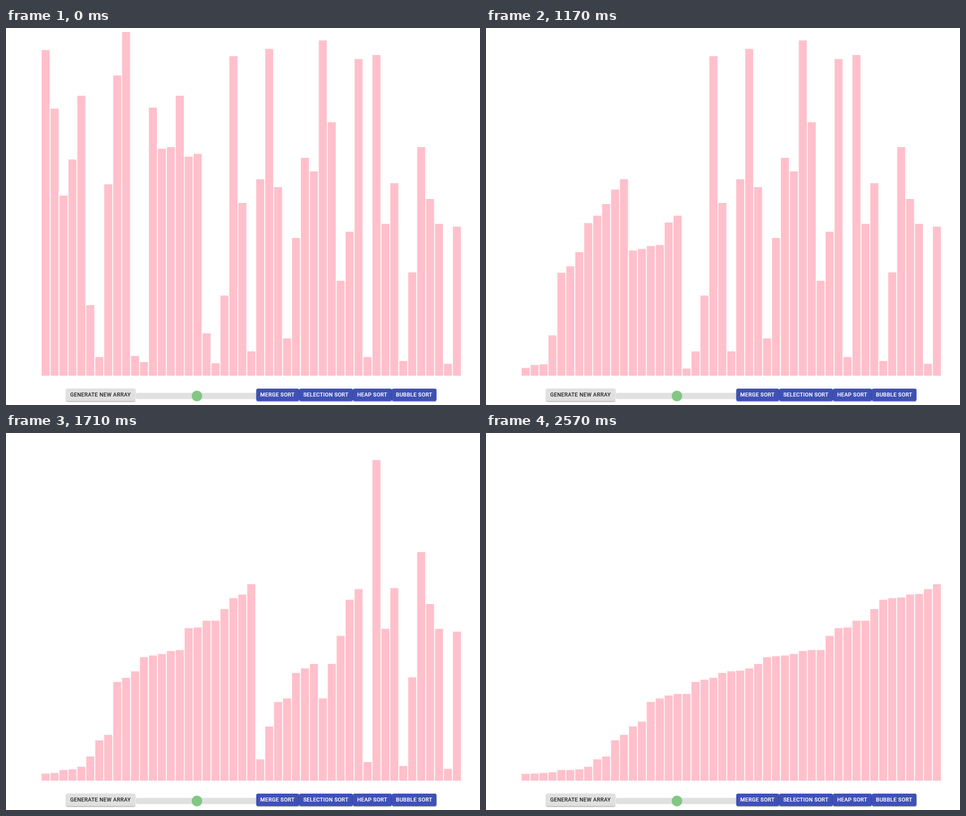
Animation of 839x668 px, one loop 3670 ms. Source, as an HTML page:

```html
<!DOCTYPE html>
<html lang="en">
<head>
<meta charset="utf-8">
<title>Merge sort</title>
<style>
  html, body { margin: 0; width: 100%; height: 100%; overflow: hidden; background: #fff; }
  #stage { position: relative; width: 839px; height: 668px; overflow: hidden; }
  svg { position: absolute; left: 0; top: 0; }
  .btn {
    position: absolute; top: 639px; height: 22px; box-sizing: border-box;
    padding-left: 7.4px; border-radius: 3px; overflow: hidden; white-space: nowrap;
    font: 500 9.58px/21.6px Roboto, "Liberation Sans", sans-serif; letter-spacing: .02857em;
    color: #fff; background: #3f51b5; -webkit-text-stroke: .2px #fff;
    box-shadow: 0 2.2px .7px -1.5px rgba(0,0,0,.2), 0 1.5px 1.5px rgba(0,0,0,.14), 0 .7px 3.7px rgba(0,0,0,.12);
  }
  .plain { color: rgba(0,0,0,.87); background: #e0e0e0; -webkit-text-stroke: 0; }
  #ripple { position: absolute; border-radius: 50%; background: #fff; }
</style>
</head>
<body>
<div id="stage">
  <svg width="839" height="668" viewBox="0 0 839 668">
    <g id="bars"></g>
    <rect x="230" y="646.4" width="220" height="11.1" rx="3.7" fill="#e0e0e0"/>
    <circle cx="338" cy="652" r="9.4" fill="#82c784"/>
  </svg>
</div>
<script>
const LOOP = 3670, BASE = 616;
const SHRINK = 4 / 7; // bars become shorter once the sort writes them

// The array to sort, as the top edge of each bar.
const tops = [39, 143, 297, 233, 120, 491, 583, 277, 84, 7, 581, 592, 141, 214, 211, 120,
  228, 223, 541, 594, 474, 50, 310, 573, 268, 37, 282, 550, 372, 230, 254, 22,
  167, 448, 361, 55, 583, 48, 347, 275, 590, 433, 211, 303, 347, 595, 352];
const heights = tops.map(y => BASE - y);

// Each move: the two bars compared, then the slot that gets a new height.
const moves = [];
function mergeSort(list, from, to) {
  if (from === to) return;
  const mid = (from + to) >> 1;
  mergeSort(list, from, mid);
  mergeSort(list, mid + 1, to);
  const old = list.slice();
  let i = from, j = mid + 1;
  for (let k = from; k <= to; k++) {
    const a = i <= mid ? i : j, b = j <= to ? j : i;
    const left = j > to || (i <= mid && old[i] <= old[j]);
    list[k] = old[left ? i++ : j++];
    moves.push({ a, b, k, h: list[k] * SHRINK });
  }
}
mergeSort(heights.slice(), 0, heights.length - 1);
const STEPS = moves.length * 3; // mark, unmark, set height

// Sort steps done by a given time; the page stalls briefly after the click.
const pace = [[700, 0], [720, 10], [800, 14], [1010, 112], [1340, 274], [1710, 453], [2100, 610], [2500, STEPS]];

// The screen repaints about every 26 ms, in bursts with short pauses between.
const bursts = [[270, 770], [800, 1320], [1340, 1790], [1890, 2410], [2440, 2570]];
function lastRepaint(time) {
  const burst = bursts.filter(([start]) => start <= time).pop();
  if (!burst) return 0;
  const [start, end] = burst;
  const gap = (end - start) / Math.round((end - start) / 26);
  const tick = n => Math.round((start + n * gap) / 10) * 10;
  let n = Math.ceil((Math.min(time, end) - start) / gap);
  if (tick(n) > time) n--;
  return Math.min(tick(n), end);
}

const clamp = v => Math.min(1, Math.max(0, v));
const ramp = (t, from, to) => clamp((t - from) / (to - from));
const smooth = p => p * p * (3 - 2 * p);

function along(points, t) {
  const next = points.findIndex(([time]) => time >= t);
  if (next < 0) return points[points.length - 1][1];
  if (next === 0) return points[0][1];
  const [t0, v0] = points[next - 1], [t1, v1] = points[next];
  return v0 + (v1 - v0) * ramp(t, t0, t1);
}

const bars = heights.map((h, i) => {
  const bar = document.createElementNS('http://www.w3.org/2000/svg', 'rect');
  bar.setAttribute('x', 63.05 + 15.826 * i);
  bar.setAttribute('width', 14.2);
  return document.getElementById('bars').appendChild(bar);
});

function addButton(label, left, right, kind = '') {
  const el = document.createElement('div');
  el.className = 'btn ' + kind;
  el.textContent = label;
  el.style.left = left + 'px';
  el.style.width = right - left + 'px';
  return document.getElementById('stage').appendChild(el);
}
addButton('GENERATE NEW ARRAY', 106, 228.5, 'plain');
const mergeButton = addButton('MERGE SORT', 442.7, 518.8);
addButton('SELECTION SORT', 518.8, 614);
addButton('HEAP SORT', 614, 682.9);
addButton('BUBBLE SORT', 682.9, 762.2);
const ripple = document.createElement('div');
ripple.id = 'ripple';
mergeButton.appendChild(ripple);

function drawBars(step) {
  const done = Math.floor(step / 3), now = heights.slice();
  for (const { k, h } of moves.slice(0, done)) now[k] = h;
  const marked = step % 3 === 1 ? moves[done] : {};
  bars.forEach((bar, i) => {
    bar.setAttribute('y', BASE - now[i]);
    bar.setAttribute('height', now[i]);
    bar.setAttribute('fill', i === marked.a || i === marked.b ? '#ff0000' : '#ffc0cb');
  });
}

function drawMergeButton(t) {
  const hover = ramp(t, 270, 520) - ramp(t, 720, 830);
  const mix = (a, b) => a + (b - a) * hover;
  mergeButton.style.background = `rgb(${mix(63, 48)},${mix(81, 63)},${mix(181, 159)})`;
  mergeButton.style.boxShadow =
    `0 ${mix(2.2, 1.5)}px ${mix(.7, 2.9)}px ${mix(-1.5, -.7)}px rgba(0,0,0,.2),` +
    `0 ${mix(1.5, 2.9)}px ${mix(1.5, 3.7)}px rgba(0,0,0,.14),` +
    `0 .7px ${mix(3.7, 7.4)}px rgba(0,0,0,.12)`;
  const r = 66 * smooth(ramp(t, 605, 1135));
  ripple.style.left = 64.3 - r + 'px';
  ripple.style.top = 11 - r + 'px';
  ripple.style.width = ripple.style.height = 2 * r + 'px';
  ripple.style.opacity = .2 * (1 - ramp(t, 860, 1160));
}

function draw(time) {
  const t = lastRepaint(time);
  drawBars(Math.round(along(pace, t)));
  drawMergeButton(t);
}

function loop() {
  draw(performance.now() % LOOP);
  requestAnimationFrame(loop);
}
loop();
</script>
</body>
</html>
```
